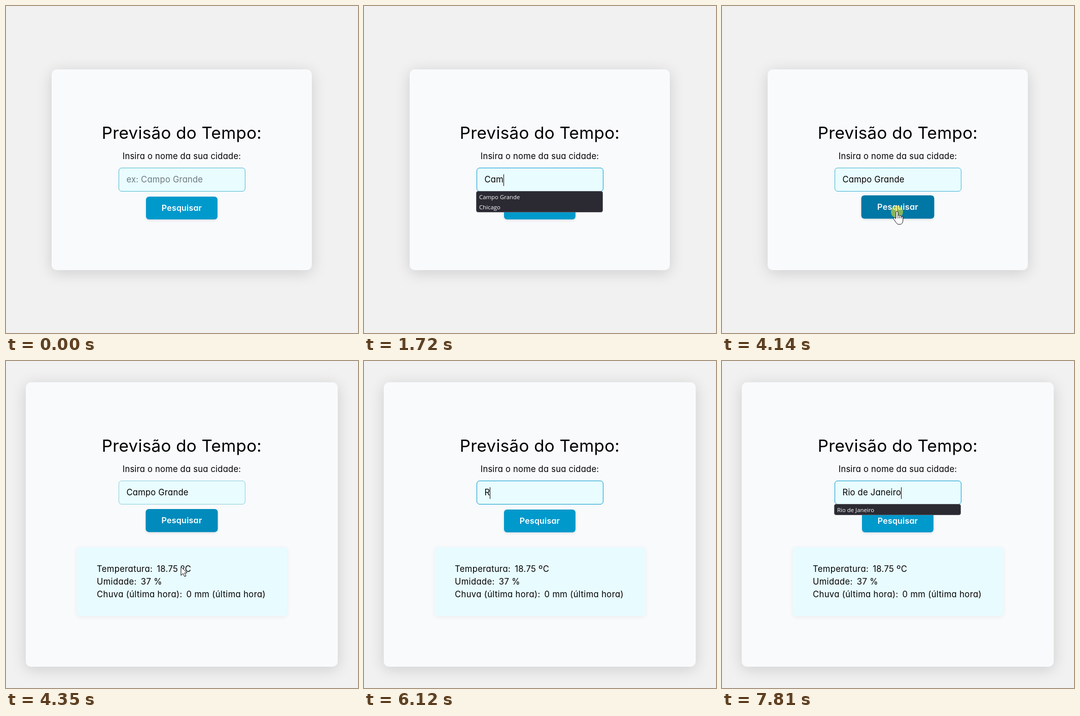
These frames come from a looping animation (694 px wide and 645 px high, 8000 ms). An HTML page:

```html
<!DOCTYPE html>
<html lang="pt-BR">
<head>
<meta charset="utf-8">
<title>Previsão do Tempo</title>
<style>
  * { box-sizing: border-box; }
  html, body { margin: 0; width: 100%; height: 100%; overflow: hidden; background: #f1f1f1; }
  body { position: relative; color: #000; font: 16.6px/24px Inter, sans-serif; font-feature-settings: "cv11"; letter-spacing: .012em; }
  #card, #form, #form > *, #pointer { position: absolute; }
  #card { border-radius: 10px; background: #f9fafc; box-shadow: 0 5px 30px rgba(0, 0, 0, .15); }
  #form, #pointer { left: 0; top: 0; width: 694px; height: 645px; }
  h1, .label { left: 0; width: 693px; margin: 0; text-align: center; white-space: nowrap; }
  h1 { top: 226px; font: 400 33.2px/48px Inter, sans-serif; letter-spacing: .008em; }
  .label { top: 284px; }
  #field { left: 222px; top: 319px; width: 250px; height: 47px; padding: 0 14.5px; border: 1px solid; border-radius: 6px;
    background: #e9fcff; line-height: 45px; white-space: pre; }
  #caret { display: inline-block; width: 1px; height: 23px; margin-right: -1px; background: #000; vertical-align: middle; }
  #hint { color: #6b7b80; }
  #typed.selected { background: #0078d7; color: #fff; }
  #button { left: 276px; top: 376px; width: 141px; height: 45px; border-radius: 6px; color: #fff; font-size: 16px; font-weight: 600;
    line-height: 45px; text-align: center; box-shadow: 0 2px 5px rgba(0, 0, 0, .1); }
  #list { left: 221px; top: 365px; width: 250px; padding: 1px 0 0 5px; border: 1px solid #5b5a64; border-radius: 4px; overflow: hidden;
    color: #fbfbfe; font: 11.4px/20px "Open Sans", sans-serif; letter-spacing: 0; white-space: pre; }
  #result { left: 346.5px; top: 450px; transform: translateX(-50%); padding: 30.5px 40px; border-radius: 6px; background: #e8fbff;
    box-shadow: 0 2px 10px rgba(0, 0, 0, .06); line-height: 25px; letter-spacing: .022em; white-space: nowrap; }
  #result.full { width: 415px; height: 136px; }
  #result span { margin-left: 3px; }
  #pointer { overflow: hidden; }
</style>
</head>
<body>
<div id="card"></div>
<div id="form">
  <h1>Previsão do Tempo:</h1>
  <div class="label">Insira o nome da sua cidade:</div>
  <div id="field"><span id="typed"></span><span id="caret"></span><span id="hint">ex: Campo Grande</span></div>
  <div id="button">Pesquisar</div>
  <div id="loading"></div>
  <div id="result"></div>
  <div id="list"></div>
</div>
<svg id="pointer">
  <g id="mouse">
    <circle id="click" r="12" fill="#ffee1e" fill-opacity=".52"/>
    <path id="arrow" d="M0 0V17l4-4 3 6 3-1-3-6h5z" fill="#fff" stroke="#000"/>
    <path id="beam" d="M-3.5-7.5h3l.5.5.5-.5h3M0-7V7M-3.5 7.5h3L0 7l.5.5h3" fill="none" stroke="#000"/>
    <g id="hand" fill="#fff" stroke="#111" stroke-linejoin="round">
      <path d="M-2 13V1a2 2 0 0 1 4 0v7c0-2 3.5-2 3.5 0v1c0-2 3.3-2 3.3.3v1c0-1.7 3-1.5 3 .4v5c0 5-2 9-6 9h-2c-3 0-5-2-6.5-5l-4-5.5c-1.2-2 1-3.4 2.6-2z"/>
      <path d="M2 8v5M5.5 9v4M8.8 10v3"/>
    </g>
  </g>
</svg>
<script>
const LOOP = 8000;
const TIME = {
  enter: 70, focus: 820, open: 1030, type: 1370, typed: 3190,
  aim: 3520, blur: 3950, search: 4100, load: 4260, done: 4350,
  refocus: 5400, select: 5560, clear: 5790, retype: 6120, retyped: 7810
};
const LIST_LAG = 120, CLICK_LENGTH = 120;
const HISTORY = ['São Paulo', 'Campo Grande', 'Rio de Janeiro', 'Chicago', 'Lisboa', 'Cuiabá'];
const REPORT = 'Temperatura: <span>18.75 ºC</span><br>Umidade: <span>37 %</span><br>Chuva (última hora): <span>0 mm (última hora)</span>';

const $ = id => document.getElementById(id);
const show = (id, on) => { $(id).style.display = on ? '' : 'none'; };
const within = (v, from, to) => v >= from && v < to;
const ramp = (t, start, length) => Math.min(1, Math.max(0, (t - start) / length));
const ease = k => k * k * (3 - 2 * k);
const lerp = (a, b, k) => a + (b - a) * k;
const mix = (a, b, k) => `rgb(${a.map((v, i) => Math.round(lerp(v, b[i], k)))})`;

// Steady typing: first letter at start, last letter at end
function typeOut(text, t, start, end) {
  const pace = (end - start) / (text.length - 1);
  return text.slice(0, Math.max(0, Math.floor((t - start) / pace + 1.001)));
}
const textAt = t => t < TIME.clear
  ? typeOut('Campo Grande', t, TIME.type, TIME.typed)
  : typeOut('Rio de Janeiro', t, TIME.retype, TIME.retyped);

function suggestionsAt(t) {
  const query = textAt(t - LIST_LAG).toLowerCase();
  const open = within(t, TIME.open, TIME.blur) || (t >= TIME.retype && query);
  return open ? HISTORY.filter(city => city.toLowerCase().includes(query)) : [];
}

function glide(t, start, length, from, to) {
  const k = ease(ramp(t, start, length));
  return from.map((v, i) => lerp(v, to[i], k));
}
function mouseAt(t) {
  if (t < TIME.aim) return glide(t, TIME.enter, 550, [645, 614], [390, 343]);
  if (t < TIME.done) return glide(t, TIME.aim, 450, [359, 394], [345, 406]);
  return glide(t, TIME.done, 560, [345, 406], [410, 268]);
}

// The card stays centred and grows with the lines of the result
function drawCard(lines) {
  const height = 396 + (lines && 90 + 25 * lines);
  const width = lines > 1 ? 615 : 513;
  const top = Math.round((645 - height) / 2);
  Object.assign($('card').style, {
    left: Math.floor(346.5 - width / 2) + 'px', top: top + 'px', width: width + 'px', height: height + 'px'
  });
  return top - 125;
}

function drawField(t) {
  const text = textAt(t);
  const selected = within(t, TIME.select, TIME.clear);
  const focus = .55 * (1 - ramp(t, 0, 350)) + ramp(t, TIME.focus, 280)
    - ramp(t, TIME.blur, 500) + ramp(t, TIME.refocus, 250);
  $('typed').textContent = text;
  $('typed').className = selected ? 'selected' : '';
  show('hint', !text);
  show('caret', within(t, TIME.focus, TIME.blur) || (t >= TIME.refocus && !selected));
  $('field').style.borderColor = mix([169, 220, 223], [0, 153, 204], focus);
}

function drawButton(t) {
  const hover = ramp(t, TIME.aim, 200) - ramp(t, TIME.load, 150);
  $('button').style.background = mix([0, 153, 204], [0, 119, 165], hover);
  $('button').style.transform = hover ? `translateY(${-2 * hover}px) scale(${1 + .02 * hover})` : 'none';
}

function drawList(t) {
  const rows = suggestionsAt(t);
  show('list', rows.length);
  $('list').textContent = rows.join('\n');
  $('list').style.height = rows.length * 20 + 2 + 'px';
  $('list').style.background = within(t, TIME.aim, TIME.blur) ? '#4b4a54' : '#2b2a33';
}

function drawResult(lines) {
  show('result', lines);
  $('result').className = lines > 1 ? 'full' : '';
  $('result').innerHTML = lines > 1 ? REPORT : 'Carregando...';
}

function drawMouse(t, shift) {
  const [x, y] = mouseAt(t).map(Math.round);
  const overField = within(x, 222, 472) && within(y - shift, 319, 366);
  const overButton = within(x, 276, 417) && within(y - shift, 376, 421);
  const clicks = [TIME.focus, TIME.search, TIME.refocus, TIME.select];
  show('mouse', within(t, TIME.enter, TIME.type) || within(t, TIME.aim, TIME.clear));
  $('mouse').setAttribute('transform', `translate(${x} ${y})`);
  show('click', clicks.some(c => within(t, c, c + CLICK_LENGTH)));
  show('beam', overField);
  show('hand', overButton);
  show('arrow', !overField && !overButton);
}

function draw(t) {
  const lines = t < TIME.load ? 0 : t < TIME.done ? 1 : 3;
  const shift = drawCard(lines);
  $('form').style.transform = `translateY(${shift}px)`;
  drawField(t);
  drawButton(t);
  drawList(t);
  drawResult(lines);
  drawMouse(t, shift);
}

let start;
function tick(now) {
  start ??= now;
  draw((now - start) % LOOP);
  requestAnimationFrame(tick);
}
draw(0);
requestAnimationFrame(tick);
</script>
</body>
</html>
```
